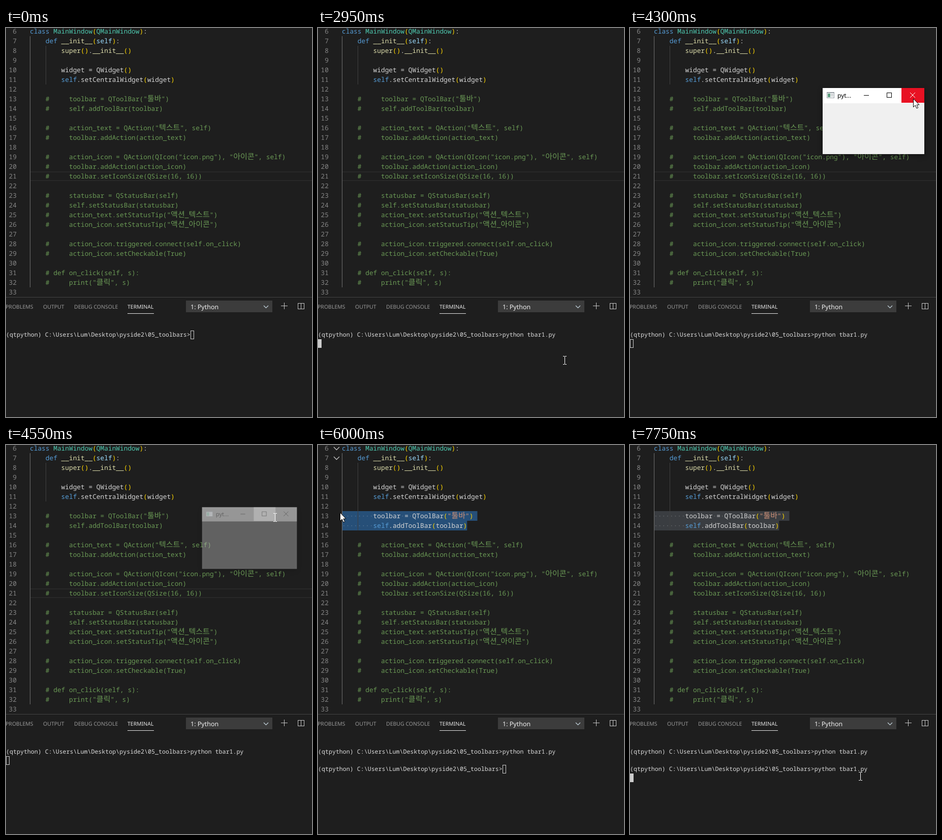
Recreate the animation shown at these times as an HTML page with a canvas. Size 602 by 765 pixels, loop 8000 ms.

```html
<!DOCTYPE html>
<html lang="en">
<head>
<meta charset="utf-8">
<title>Editor and terminal</title>
<style>
html, body { margin: 0; width: 100%; height: 100%; overflow: hidden; background: #1e1e1e; }
canvas { display: block; }
</style>
</head>
<body>
<canvas id="stage" width="602" height="765"></canvas>
<script>
const ctx = document.getElementById('stage').getContext('2d');
const LOOP = 8000, STEP = 50;
const FIRST_LINE = 6, CODE_X = 47, LINE_HEIGHT = 19;
const MONO = '"Noto Sans Mono", monospace';
const CODE_FONT = '12.83px ' + MONO;
const HANGUL_FONT = '300 15px "Noto Sans CJK KR", "Noto Sans CJK", sans-serif';
const TERM_FONT = '11.64px ' + MONO;
const UI = '"Noto Sans", sans-serif';

const code = `class MainWindow(QMainWindow):
    def __init__(self):
        super().__init__()

        widget = QWidget()
        self.setCentralWidget(widget)

    #     toolbar = QToolBar("툴바")
    #     self.addToolBar(toolbar)

    #     action_text = QAction("텍스트", self)
    #     toolbar.addAction(action_text)

    #     action_icon = QAction(QIcon("icon.png"), "아이콘", self)
    #     toolbar.addAction(action_icon)
    #     toolbar.setIconSize(QSize(16, 16))

    #     statusbar = QStatusBar(self)
    #     self.setStatusBar(statusbar)
    #     action_text.setStatusTip("액션_텍스트")
    #     action_icon.setStatusTip("액션_아이콘")

    #     action_icon.triggered.connect(self.on_click)
    #     action_icon.setCheckable(True)

    # def on_click(self, s):
    #     print("클릭", s)
`.split('\n');

const syntax = [
  [/^"/, '#ce9178'], [/^(class|def|self)$/, '#569cd6'], [/^Q?MainWindow$/, '#4ec9b0'],
  [/^(super|__init__)$/, '#dcdcaa'], [/^[()]$/, '#ffd700']
];
const PROMPT = '(qtpython) C:\\Users\\Lum\\Desktop\\pyside2\\05_toolbars>';
const COMMAND = 'python tbar1.py';
const keyTimes = [1150, 1200, 1350, 1400, 1450, 1550, 1600, 1800,
  1950, 2050, 2150, 2200, 2450, 2550, 2650];

// Moments of the story, in ms
const ENTER = 2950, OPEN = 3300, CLOSE = 4500, PROMPT_BACK = 4750, PRESS = 4850, DRAG = 4950,
  UNCOMMENT = 5700, RECOLOUR = 5850, TERMINAL_CLICK = 7200, RECALL = 7650, ENTER_AGAIN = 7750;
const clicks = [[500, 600], [4350, 4450], [PRESS, 5450], [7200, 7300]];

// Pointer path: time, x, y
const path = [
  [150, 517, 752], [300, 500, 690], [450, 485, 653], [3600, 485, 653],
  [3800, 450, 520], [4000, 440, 290], [4150, 462, 165], [4200, 492, 142],
  [4250, 530, 139], [4300, 557, 139], [4500, 557, 139], [4600, 500, 145],
  [4750, 360, 158], [4850, 312, 157], [4900, 273, 148], [4950, 220, 142],
  [5000, 166, 139], [5100, 166, 139], [5300, 90, 138], [5500, 43, 133],
  [6600, 43, 133], [6800, 130, 260], [7000, 340, 530], [7150, 440, 640], [7200, 453, 651]
];

const within = (t, a, b) => t >= a && t < b;
const rowTop = line => (line - FIRST_LINE) * LINE_HEIGHT - 3;

function rect(x, y, w, h, color) {
  ctx.fillStyle = color;
  ctx.fillRect(x, y, w, h);
}

function stroke(points, color, width = 1) {
  ctx.beginPath();
  points.forEach(([x, y]) => ctx.lineTo(x, y));
  ctx.strokeStyle = color;
  ctx.lineWidth = width;
  ctx.stroke();
}

function label(text, x, y, font, color) {
  ctx.font = font;
  ctx.fillStyle = color;
  ctx.fillText(text, x, y);
}

// Writes code with its Hangul parts and returns the end x; only measures without a colour.
function write(text, x, y, color) {
  for (const run of text.match(/[가-힣]+|[^가-힣]+/g) || []) {
    ctx.font = /[가-힣]/.test(run) ? HANGUL_FONT : CODE_FONT;
    if (color) {
      ctx.fillStyle = color;
      ctx.fillText(run, x, y);
    }
    x += ctx.measureText(run).width;
  }
  return x;
}

function writeLine(text, y, goldBrackets) {
  if (/^ *#/.test(text)) return write(text, CODE_X, y, '#6a9955');
  let x = CODE_X;
  for (const token of text.match(/"[^"]*"|\w+|[()]|[^\w()"]+/g) || []) {
    let color = (syntax.find(([rule]) => rule.test(token)) || [0, '#d4d4d4'])[1];
    if (token === 'self' && text.includes('def')) color = '#9cdcfe';
    if (/^[()]$/.test(token) && !goldBrackets) color = '#d4d4d4';
    x = write(token, x, y, color);
  }
}

function pointerAt(t) {
  if (t < path[0][0]) return null;
  const next = path.findIndex(key => key[0] > t);
  if (next < 0) return { x: 453, y: 651 };
  const [t0, x0, y0] = path[next - 1], [t1, x1, y1] = path[next];
  const p = (t - t0) / (t1 - t0);
  return { x: x0 + (x1 - x0) * p, y: y0 + (y1 - y0) * p };
}

function drawSelection(t, pointer, lines) {
  ctx.font = CODE_FONT;
  const cell = ctx.measureText('0').width;
  const head = t >= 5500 ? 0 : Math.max(0, Math.round((pointer.x - CODE_X) / cell));
  const color = t < TERMINAL_CLICK ? '#264f78' : '#3a3d41';
  [[13, head, 8], [14, 0, 0]].forEach(([line, from, tail]) => {
    const text = lines[line - FIRST_LINE], x = CODE_X + from * cell, y = rowTop(line);
    rect(x, y, write(text, CODE_X, 0) + tail - x, LINE_HEIGHT, color);
    [...text].forEach((char, i) => {
      if (char === ' ' && i >= from)
        rect(CODE_X + (i + .5) * cell - .7, y + 9, 1.5, 1.5, 'rgba(227,228,226,.25)');
    });
  });
  return CODE_X + head * cell;
}

function drawEditor(t, pointer) {
  const uncommented = t >= UNCOMMENT;
  const lines = code.map((text, i) =>
    uncommented && (i === 7 || i === 8) ? text.replace('# ', '') : text);

  if (t < DRAG) {
    const y = rowTop(t < PRESS ? 21 : 14);
    rect(CODE_X, y, 555, 2, '#282828');
    rect(CODE_X, y + LINE_HEIGHT - 2, 555, 2, '#282828');
  }
  const headX = t >= DRAG ? drawSelection(t, pointer, lines) : 0;

  rect(CODE_X, rowTop(7), 1, LINE_HEIGHT * 26, '#707070');
  rect(78, rowTop(8), 1, LINE_HEIGHT * (uncommented ? 7 : 4), '#404040');

  lines.forEach((text, i) => {
    const line = i + FIRST_LINE, y = rowTop(line) + 14;
    ctx.textAlign = 'right';
    label(line, 21, y, CODE_FONT, '#858585');
    ctx.textAlign = 'left';
    writeLine(text, y, line < 13 || t >= RECOLOUR);
  });

  if (pointer && pointer.x < CODE_X)
    for (const y of [4, 23]) stroke([[31, y], [36.5, y + 5.5], [42, y]], '#c5c5c5', 1.3);

  if (within(t, PRESS, TERMINAL_CLICK) && !within(t, 6000, 6350)) {
    const x = t < DRAG ? write(lines[8], CODE_X, 0) : headX;
    rect(Math.round(x), rowTop(t < DRAG ? 14 : 13), 2, LINE_HEIGHT, '#aeafad');
  }
}

function drawPanelHeader() {
  rect(0, 529, 602, 236, '#1e1e1e');
  rect(0, 529, 602, 1, '#434343');
  [['PROBLEMS', -1], ['OUTPUT', 73], ['DEBUG CONSOLE', 134], ['TERMINAL', 239]].forEach(([text, x]) =>
    label(text, x, 552, '10.5px ' + UI, x === 239 ? '#e7e7e7' : '#979797'));
  rect(239, 561, 52, 1, '#e7e7e7');
  rect(354, 536, 170, 23, '#3c3c3c');
  label('1: Python', 363, 553, '12.5px ' + UI, '#f0f0f0');
  stroke([[507, 546], [511.5, 550.5], [516, 546]], '#c5d5de', 1.2);
  rect(541, 546, 13, 1, '#c5c5c5');
  rect(547, 540, 1, 13, '#c5c5c5');
  ctx.strokeStyle = '#c5c5c5';
  ctx.lineWidth = 1;
  ctx.strokeRect(574.5, 541.5, 12, 11);
  rect(580, 541, 1, 12, '#c5c5c5');
}

function drawTerminal(t) {
  const typed = COMMAND.slice(0, keyTimes.filter(time => time <= t).length);
  const recalled = t >= RECALL ? COMMAND : '';
  const rows = [PROMPT + typed, '', t >= PROMPT_BACK ? PROMPT + recalled : '', ''];
  rows.forEach((text, i) => label(text, 0, 607 + i * 17, TERM_FONT, '#dcdcdc'));

  const row = t < ENTER ? 0 : t < PROMPT_BACK ? 1 : t < ENTER_AGAIN ? 2 : 3;
  const x = Math.round(ctx.measureText(rows[row]).width), y = 595 + row * 17;
  const focused = within(t, 550, OPEN) || within(t, 4600, PRESS) || t >= TERMINAL_CLICK;
  if (focused) rect(x, y, 7, 17, '#cccccc');
  else {
    ctx.strokeStyle = '#cccccc';
    ctx.lineWidth = 1;
    ctx.strokeRect(x + .5, y + .5, 6, 16);
  }
}

function drawWindow(t, pointer) {
  const shown = Math.min(1, t < CLOSE ? (t - OPEN + STEP) / 200 : 1 - (t - CLOSE + STEP) / 150);
  if (t < OPEN || shown <= 0) return;
  const scale = .9 + .1 * shown;
  ctx.save();
  ctx.globalAlpha = shown;
  ctx.translate(479, 183);
  ctx.scale(scale, scale);
  ctx.translate(-479, -183);

  ctx.save();
  ctx.shadowColor = 'rgba(0,0,0,.4)';
  ctx.shadowBlur = 10;
  ctx.shadowOffsetY = 3;
  rect(379, 118, 200, 130, '#f0f0f0');
  ctx.restore();
  rect(379, 118, 200, 30, '#ffffff');

  rect(387, 126, 15, 12, '#9aa0a6');
  rect(388, 128, 13, 9, '#f4f6f7');
  rect(389, 129, 5, 7, '#5b9a7c');
  rect(395, 130, 5, 1, '#9aa0a6');
  rect(395, 133, 5, 1, '#9aa0a6');
  label('pyt...', 408, 137, '12px ' + UI, '#000');

  const button = pointer.y < 148 ? Math.floor((pointer.x - 442) / 46) : -1;
  const closeHover = button === 2;
  if (button === 0 || button === 1) rect(442 + button * 46, 118, 46, 29, '#e5e5e5');
  if (closeHover) rect(534, 118, 45, 29, within(t, 4350, 4450) ? '#f1707a' : '#e81123');
  rect(460, 132, 10, 1, '#000');
  ctx.strokeStyle = '#000';
  ctx.lineWidth = 1;
  ctx.strokeRect(505.5, 127.5, 9, 9);
  const cross = closeHover ? '#fff' : '#000';
  stroke([[551, 127], [561, 137]], cross);
  stroke([[561, 127], [551, 137]], cross);
  ctx.restore();
}

function drawPointer(t, pointer) {
  if (!pointer) return;
  const { x, y } = pointer;
  if (clicks.some(([a, b]) => within(t, a, b))) {
    ctx.beginPath();
    ctx.arc(x - 1, y, 12, 0, Math.PI * 2);
    ctx.fillStyle = 'rgba(255,230,0,.63)';
    ctx.fill();
  }
  const overWindow = within(t, OPEN, CLOSE) && x > 379 && x < 579 && y > 118 && y < 248;
  ctx.save();
  ctx.translate(Math.round(x), Math.round(y));
  if (overWindow || x < CODE_X || (y > 530 && y < 575)) {
    const arrow = new Path2D('M.5 0V16.5L4.3 13L7 19L9.7 17.8L7.1 12H12Z');
    ctx.fillStyle = '#fff';
    ctx.fill(arrow);
    ctx.strokeStyle = '#000';
    ctx.lineWidth = 1;
    ctx.stroke(arrow);
  } else {
    rect(0, -7, 1, 15, '#fff');
    for (const end of [-8, 8]) {
      rect(-3, end, 3, 1, '#fff');
      rect(1, end, 3, 1, '#fff');
    }
  }
  ctx.restore();
}

function frame(now) {
  const t = Math.floor(now % LOOP / STEP) * STEP;
  const pointer = pointerAt(t);
  ctx.textRendering = 'geometricPrecision';
  rect(0, 0, 602, 765, '#1e1e1e');
  drawEditor(t, pointer);
  drawPanelHeader();
  drawTerminal(t);
  drawWindow(t, pointer);
  drawPointer(t, pointer);
  requestAnimationFrame(frame);
}
requestAnimationFrame(frame);
</script>
</body>
</html>
```
